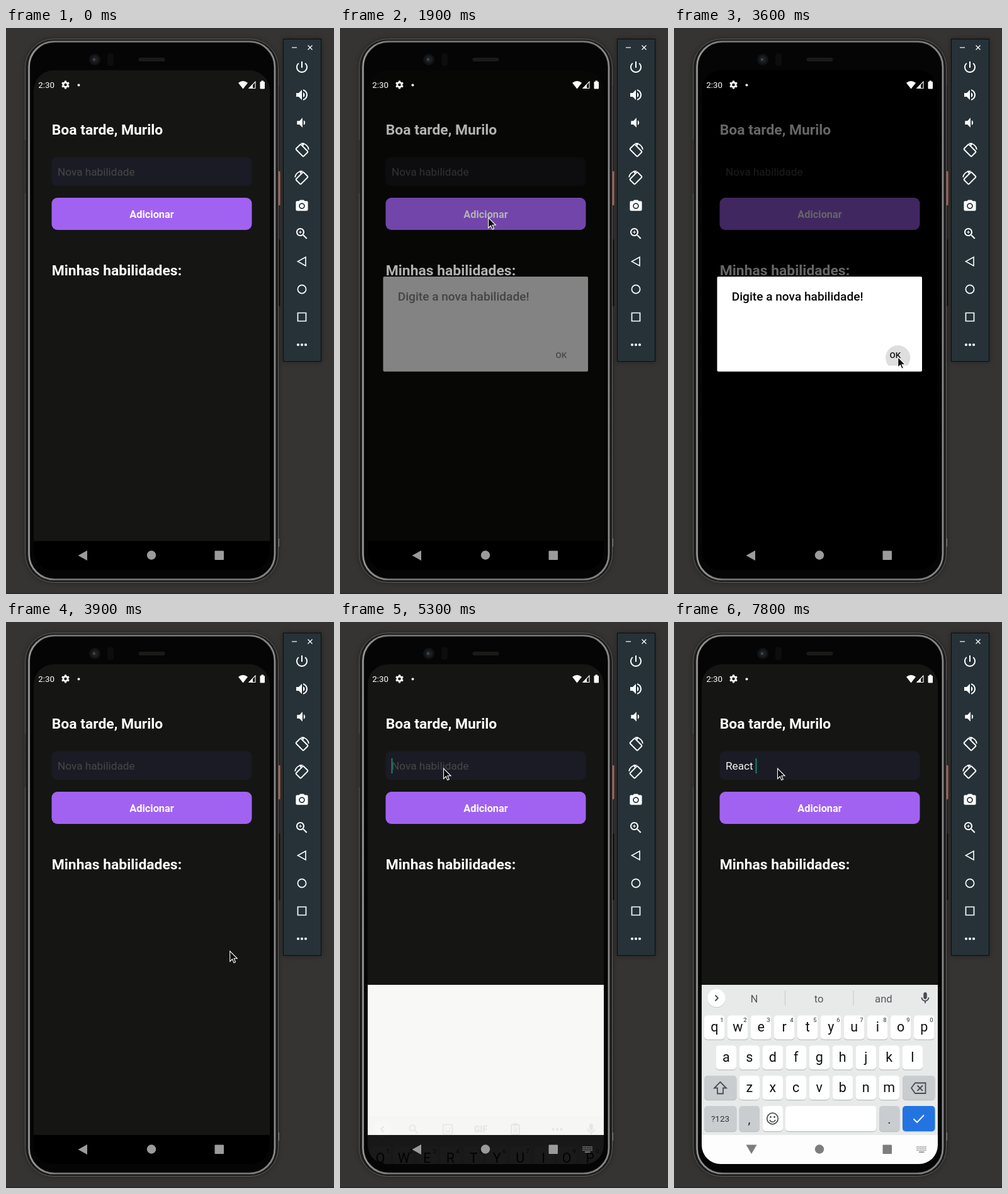
These frames come from a looping animation (521 by 897 pixels, 8000 ms). An HTML page with a canvas:

```html
<!DOCTYPE html>
<html lang="pt">
<head>
<meta charset="utf-8">
<title>Habilidades</title>
<style>
html, body { margin: 0; width: 100%; height: 100%; overflow: hidden; background: #353432; }
canvas { display: block; width: 521px; height: 897px; }
</style>
</head>
<body>
<canvas id="stage"></canvas>
<script>
const W = 521, H = 897, LOOP = 8000, STEP = 100;
const ratio = window.devicePixelRatio || 1;
const canvas = document.getElementById('stage');
const layer = document.createElement('canvas');
for (const surface of [canvas, layer]) {
  surface.width = W * ratio;
  surface.height = H * ratio;
}
const mainCtx = canvas.getContext('2d');
const layerCtx = layer.getContext('2d');
let c = mainCtx; // current drawing context

const ICONS = {
  power: 'M13 3h-2v10h2V3zm4.83 2.17l-1.42 1.42C17.99 7.86 19 9.81 19 12c0 3.87-3.13 7-7 7s-7-3.13-7-7c0-2.19 1.01-4.14 2.58-5.42L6.17 5.17C4.23 6.82 3 9.26 3 12c0 4.97 4.03 9 9 9s9-4.03 9-9c0-2.74-1.23-5.18-3.17-6.83z',
  louder: 'M3 9v6h4l5 5V4L7 9H3zm13.5 3c0-1.77-1.02-3.29-2.5-4.03v8.05c1.48-.73 2.5-2.25 2.5-4.02zM14 3.23v2.06c2.89.86 5 3.54 5 6.71s-2.11 5.85-5 6.71v2.06c4.01-.91 7-4.49 7-8.77s-2.99-7.86-7-8.77z',
  softer: 'M18.5 12c0-1.77-1.02-3.29-2.5-4.03v8.05c1.48-.73 2.5-2.25 2.5-4.02zM5 9v6h4l5 5V4L9 9H5z',
  camera: 'M9 2L7.17 4H4c-1.1 0-2 .9-2 2v12c0 1.1.9 2 2 2h16c1.1 0 2-.9 2-2V6c0-1.1-.9-2-2-2h-3.17L15 2H9zm3 15c-2.76 0-5-2.24-5-5s2.24-5 5-5 5 2.24 5 5-2.24 5-5 5z',
  search: 'M15.5 14h-.79l-.28-.27C15.41 12.59 16 11.11 16 9.5 16 5.91 13.09 3 9.5 3S3 5.91 3 9.5 5.91 16 9.5 16c1.61 0 3.09-.59 4.23-1.57l.27.28v.79l5 4.99L20.49 19l-4.99-5zm-6 0C7.01 14 5 11.99 5 9.5S7.01 5 9.5 5 14 7.01 14 9.5 11.99 14 9.5 14z',
  plus: 'M12 10h-2v2H9v-2H7V9h2V7h1v2h2z',
  mic: 'M12 14c1.66 0 3-1.34 3-3V5c0-1.66-1.34-3-3-3S9 3.34 9 5v6c0 1.66 1.34 3 3 3zm5-3c0 2.76-2.24 5-5 5s-5-2.24-5-5H5c0 3.53 2.61 6.43 6 6.92V21h2v-3.08c3.39-.49 6-3.39 6-6.92h-2z'
};
for (const name in ICONS) ICONS[name] = new Path2D(ICONS[name]);
const ARROW = new Path2D('M0 0V16.4L3.8 12.8L6.3 18.6L8.8 17.5L6.4 11.8H11.6Z');

// Pointer stops: time, x, y
const POINTER = [
  [400, 123, 1], [500, 160, 85], [600, 207, 182], [700, 227, 226],
  [900, 229, 250], [1000, 234, 285], [1100, 235.7, 300.5],
  [2300, 252, 330], [2400, 310, 430], [2500, 362, 510], [2600, 354, 528],
  [3100, 356, 528], [3300, 355.7, 521.5],
  [4100, 345, 495], [4200, 296, 408], [4300, 212, 300], [4400, 165, 253], [4600, 164.5, 232]
];
const TYPED = [[0, ''], [6200, 'R'], [6500, 'Re'], [6800, 'Rea'], [7000, 'Reac'], [7200, 'React'], [7500, 'React ']];
const HINTS = [
  [6200, 'R', 'Re', 'Really'], [6500, 'Re', 'Red', 'Rep'], [6800, 'Rea', 'Read', 'Really'],
  [7000, 'Reac', 'React', 'Reach'], [7200, 'React', 'Reach', 'Reaction'], [7800, 'N', 'to', 'and']
];
const latest = (list, t) => list.filter(k => k[0] <= t).pop();

function box(x, y, w, h, r, fill) {
  c.beginPath();
  c.roundRect(x, y, w, h, r);
  if (fill) { c.fillStyle = fill; c.fill(); }
}
function disc(x, y, r, fill) {
  c.beginPath();
  c.arc(x, y, r, 0, 7);
  c.fillStyle = fill;
  c.fill();
}
function poly(fill, ...p) {
  c.beginPath();
  for (let i = 0; i < p.length; i += 2) c.lineTo(p[i], p[i + 1]);
  c.closePath();
  if (fill) { c.fillStyle = fill; c.fill(); }
}
function stroke(color, width) {
  c.strokeStyle = color;
  c.lineWidth = width;
  c.stroke();
}
function line(color, width, ...p) {
  c.beginPath();
  for (let i = 0; i < p.length; i += 2) c.lineTo(p[i], p[i + 1]);
  stroke(color, width);
}
function text(s, x, y, size, fill, weight = 400, align = 'left') {
  c.font = `${weight} ${size}px Roboto, sans-serif`;
  c.textAlign = align;
  c.fillStyle = fill;
  c.fillText(s, x, y);
}
function icon(name, x, y, size, fill) {
  c.save();
  c.translate(x - size / 2, y - size / 2);
  c.scale(size / 24, size / 24);
  c.fillStyle = fill;
  c.fill(ICONS[name], 'evenodd');
  c.restore();
}

function drawPhone() {
  c.fillStyle = '#353432';
  c.fillRect(0, 0, W, H);
  c.fillStyle = '#292927';
  c.fillRect(0, 895.5, W, 1.5);

  box(431, 91, 3, 350, 1, '#222');
  box(432, 335, 3.5, 106, 1, '#161616');
  box(432, 227, 3.5, 54, 1, '#cf705d');
  line('#8a8a8a', 1, 433.5, 809, 433.5, 822);

  c.save();
  c.shadowColor = 'rgba(0,0,0,.35)';
  c.shadowBlur = 9;
  box(30.5, 17.5, 402, 861, 45, '#1c1c1c');
  c.restore();
  stroke('#60605f', 1);
  const rim = c.createLinearGradient(34, 0, 430, 0);
  rim.addColorStop(0, '#9b9b9b');
  rim.addColorStop(.12, '#777');
  rim.addColorStop(.88, '#777');
  rim.addColorStop(1, '#8c8c8c');
  box(36.5, 21.5, 390.5, 852.5, 40);
  stroke(rim, 2.6);
  box(38.5, 23.5, 386.5, 848.5, 38, '#050506');
  line('#454545', 1, 30.5, 177, 30.5, 262);

  disc(141, 50, 9, '#121315');
  disc(141, 50, 5.5, '#1d2022');
  disc(140, 50, 2, '#454b50');
  box(161, 40, 10, 20, 4, '#0d0d0e');
  box(210.5, 47, 42, 6, 3, '#1a1a18');
}

function drawStatus() {
  text('2:30', 51.2, 95, 13.4, '#fff');
  c.beginPath();
  c.arc(94.5, 90, 3.6, 0, 7);
  stroke('#fff', 2.8);
  for (let i = 0; i < 6; i++) {
    const a = i * Math.PI / 3 + Math.PI / 6;
    line('#fff', 3, 94.5 + 4 * Math.cos(a), 90 + 4 * Math.sin(a), 94.5 + 6.4 * Math.cos(a), 90 + 6.4 * Math.sin(a));
  }
  disc(115.5, 90.5, 2, '#fff');
  c.beginPath();
  c.moveTo(376.5, 96.5);
  c.lineTo(369, 87);
  c.quadraticCurveTo(376.5, 81, 384, 87);
  c.fillStyle = '#fff';
  c.fill();
  poly(null, 386, 95.5, 396, 95.5, 396, 85);
  stroke('#fff', 1.1);
  poly('#fff', 385.5, 96, 392, 96, 392, 89);
  box(403.5, 85, 7.5, 11.5, 1, '#fff');
  box(405.5, 83.5, 3.5, 2, 0, '#fff');
}

function drawApp(t, dim) {
  c.fillStyle = '#000';
  c.fillRect(44, 67, 375, 792);
  c.globalAlpha = 1 - dim;
  c.fillStyle = '#151513';
  c.fillRect(44, 67, 375, 746);
  box(72.5, 205, 318, 45, 8, '#1b1b25');
  c.globalAlpha = 1;

  text('Boa tarde, Murilo', 72.7, 169, 22.9, '#fff', 700);
  text('Minhas habilidades:', 72.7, 392, 22.9, '#fff', 700);
  const pressed = t >= 1300 && t < 1900;
  c.globalAlpha = pressed ? .7 : 1;
  box(72.5, 269, 318, 51, 9, '#a162f2');
  text('Adicionar', 231.5, 301, 16.3, '#fff', 700, 'center');
  c.globalAlpha = 1;

  const typed = latest(TYPED, t)[1];
  if (typed) text(typed, 82, 234, 17.2, '#f4f4f4');
  else text('Nova habilidade', 82, 234, 17.2, '#474747');
  if (t >= 6200 && t < 7700) {
    c.fillStyle = '#e8e8e8';
    c.fillRect(82, 236, c.measureText(typed.trim()).width, 1);
  }
  const caretOn = t >= 4800 && !(t >= 5800 && t < 6200);
  if (caretOn) {
    c.fillStyle = '#188269';
    c.fillRect(81.5 + c.measureText(typed).width, 216, 2, 24);
  }
  c.fillStyle = `rgba(0,0,0,${.6 * dim})`;
  c.fillRect(44, 67, 375, 746);
}

function drawDialog(t, show) {
  c.globalAlpha = show;
  box(68.5, 394, 325.5, 150.5, 2, '#fff');
  if (t >= 3600) {
    c.save();
    c.beginPath();
    c.rect(330, 500, 50, 35);
    c.clip();
    disc(355.7, 522.5, 19.6, '#dedede');
    c.restore();
  }
  text('Digite a nova habilidade!', 91.7, 432, 19.1, '#050505', 500);
  text('OK', 342.5, 523, 13.4, '#111', 500);
  c.globalAlpha = 1;
}

function drawTools(ink) {
  icon('search', 117, 596, 20, ink);
  box(163.5, 588.5, 15, 15, 2);
  stroke(ink, 1.7);
  disc(168.5, 594, 1.2, ink);
  disc(174, 594, 1.2, ink);
  c.beginPath();
  c.arc(171, 596, 4, .3, 2.8);
  stroke(ink, 1.5);
  text('GIF', 223.5, 601, 14, ink, 900, 'center');
  box(272, 589, 13, 15, 1.5);
  stroke(ink, 1.8);
  box(275, 586.5, 7, 4, 1, ink);
  for (let i = 0; i < 3; i++) line(ink, 1.5, 275, 594 + 3 * i, 282, 594 + 3 * i);
  for (let i = -1; i < 2; i++) disc(345 + 6.5 * i, 596, 2, ink);
}

function key(x, y, w, label, h = 38, fill = '#fff') {
  box(x, y + 1.2, w, h, 5, 'rgba(70,75,80,.28)');
  box(x, y, w, h, 5, fill);
  if (label) text(label, x + w / 2, y + 25.5, 21.5, '#111', 400, 'center');
}

function drawKeys(t) {
  const ink = '#4a4d50', grey = '#c9cdd0', upper = t < 6200;
  c.fillStyle = '#e8eaea';
  c.fillRect(44, 575, 375, 238);
  c.fillStyle = '#fdfdfd';
  c.fillRect(44, 813, 375, 46);
  disc(67.5, 597, 14.3, 'rgba(70,75,80,.2)');
  disc(67.5, 596, 14.3, '#fff');
  const d = upper ? -1 : 1;
  line(ink, 1.9, 67.5 - 2 * d, 591.5, 67.5 + 2.3 * d, 596, 67.5 - 2 * d, 600.5);
  icon('mic', 399, 596, 22, ink);
  if (upper) drawTools(ink);
  else {
    latest(HINTS, t).slice(1).forEach((s, i) => text(s, 127.5 + 102.7 * i, 602.5, 16.7, '#565a5e', 400, 'center'));
    c.fillStyle = '#c4c7c9';
    c.fillRect(176, 584, 1, 24);
    c.fillRect(284.5, 584, 1, 24);
  }

  [['qwertyuiop', 48], ['asdfghjkl', 66.5], ['zxcvbnm', 103.5]].forEach(([row, x0], r) => {
    [...row].forEach((ch, i) => {
      const x = x0 + 37 * i, y = 623.5 + 47.8 * r;
      key(x, y, 32.5, upper ? ch.toUpperCase() : ch);
      if (!r) text((i + 1) % 10, x + 28, y + 10, 9.5, '#555', 500, 'center');
    });
  });

  key(48, 719, 51.5, '', 38, grey);
  poly(upper ? ink : null, 73.5, 729, 83, 738.5, 78, 738.5, 78, 747.5, 69, 747.5, 69, 738.5, 64, 738.5);
  stroke(ink, 1.8);
  key(363, 719, 51.5, '', 38, grey);
  poly(null, 377, 738.5, 383, 730.5, 399.5, 730.5, 399.5, 747, 383, 747);
  stroke(ink, 1.8);
  line(ink, 1.8, 386.5, 734.5, 395, 743);
  line(ink, 1.8, 395, 734.5, 386.5, 743);

  key(48, 767, 51.5, '', 40, grey);
  text('?123', 73.5, 792, 13.5, '#333', 400, 'center');
  key(103.5, 767, 32.5, '', 40, grey);
  text(',', 119.5, 795, 20, '#222', 400, 'center');
  key(140.5, 767, 32.5, '', 40);
  c.beginPath();
  c.arc(156.5, 787, 8.8, 0, 7);
  stroke(ink, 1.7);
  disc(153.5, 784.5, 1.4, ink);
  disc(159.5, 784.5, 1.4, ink);
  c.beginPath();
  c.arc(156.5, 787.5, 4.7, .3, 2.84);
  stroke(ink, 1.6);
  key(177, 767, 144.5, '', 40);
  key(326, 767, 32.5, '', 40, grey);
  text('.', 342, 795, 20, '#222', 400, 'center');
  key(363, 767, 51.5, '', 40, '#2374e1');
  line('#fff', 1.9, 380.5, 787.5, 386, 793, 397, 781.5);
}

// The keyboard is painted as one translucent layer while it slides in
function drawKeyboard(t) {
  const s = Math.min(1, (t - 5300) / 500);
  c = layerCtx;
  c.setTransform(ratio, 0, 0, ratio, 0, 0);
  c.clearRect(0, 0, W, H);
  c.translate(0, 208 * (1 - s) ** 2.2);
  drawKeys(t);

  c = mainCtx;
  c.save();
  c.beginPath();
  c.rect(44, 575, 375, 284);
  c.clip();
  c.fillStyle = '#f8f8f7';
  c.fillRect(44, 575, 375, 238);
  c.globalAlpha = Math.min(1, .1 + s * 1.5);
  c.drawImage(layer, 0, 0, W, H);
  c.restore();
}

function drawNav(t) {
  const open = t >= 5400, ink = open ? '#7d7d7d' : '#9b9b9b';
  if (open) poly(ink, 114.5, 828.5, 131.5, 828.5, 123, 843);
  else poly(ink, 114.5, 836, 129, 828, 129, 844);
  disc(231, 835.5, 7.2, ink);
  box(331.5, 828.5, 14.5, 14.5, 1, ink);
  if (t < 4900) return;
  for (let i = 0; i < 6; i++)
    for (let j = 0; j < 3; j++) box(385.5 + 2.7 * i, 831 + 2.7 * j, 1.6, 1.6, 0, ink);
  box(389, 839.2, 8.5, 1.6, 0, ink);
}

function drawRotate(y, flip) {
  c.save();
  c.translate(470, y);
  c.scale(flip, 1);
  c.save();
  c.rotate(Math.PI / 4);
  box(-8.5, -5.5, 17, 11, 1.5);
  stroke('#fff', 2);
  c.restore();
  c.beginPath();
  c.arc(0, 0, 11, -1.55, -.12);
  stroke('#fff', 1.7);
  poly('#fff', -2, -11.8, 4, -11.8, 2.5, -7);
  c.restore();
}

function drawPanel() {
  const ink = '#fff';
  c.save();
  c.shadowColor = 'rgba(0,0,0,.35)';
  c.shadowBlur = 8;
  box(440, 17, 61, 512, 0, '#080c0d');
  c.restore();
  box(441, 18, 59, 510, 0, '#263238');
  line(ink, 1.2, 454, 31, 462, 31);
  line(ink, 1.3, 479.5, 27.5, 486.5, 34.5);
  line(ink, 1.3, 486.5, 27.5, 479.5, 34.5);
  icon('power', 470, 62, 24, ink);
  icon('louder', 470, 106, 24, ink);
  icon('softer', 469, 150, 23, ink);
  drawRotate(194, 1);
  drawRotate(238, -1);
  icon('camera', 470, 282, 23, ink);
  disc(470, 282, 3.1, ink);
  icon('search', 470, 326, 24, ink);
  icon('plus', 470, 326, 24, ink);
  poly(null, 463.5, 370, 476, 363, 476, 377);
  stroke(ink, 1.6);
  c.beginPath();
  c.arc(470, 414, 6.6, 0, 7);
  stroke(ink, 1.7);
  box(463.5, 451.5, 13, 13, 0);
  stroke(ink, 1.7);
  for (let i = -1; i < 2; i++) disc(470 + 6 * i, 502, 2.1, ink);
}

function drawPointer(t) {
  const stop = latest(POINTER, t);
  if (!stop) return;
  c.save();
  c.translate(stop[1], stop[2]);
  c.fillStyle = '#0a0a0a';
  c.fill(ARROW);
  c.strokeStyle = '#fff';
  c.lineWidth = 1.1;
  c.stroke(ARROW);
  c.restore();
}

function dialogLevel(t) {
  if (t < 1900 || t >= 3900) return 0;
  return t < 2000 || t >= 3800 ? .5 : 1;
}

function draw(t) {
  const level = dialogLevel(t);
  c.setTransform(ratio, 0, 0, ratio, 0, 0);
  drawPhone();
  c.save();
  box(44, 67, 375, 792, [32, 32, 30, 30]);
  c.clip();
  drawApp(t, level);
  drawStatus();
  if (level) drawDialog(t, level);
  if (t >= 5300) drawKeyboard(t);
  drawNav(t);
  c.restore();
  drawPanel();
  drawPointer(t);
}

const start = performance.now();
function tick() {
  const t = (performance.now() - start) % LOOP;
  draw(Math.floor(t / STEP) * STEP);
  requestAnimationFrame(tick);
}
tick();
</script>
</body>
</html>
```
